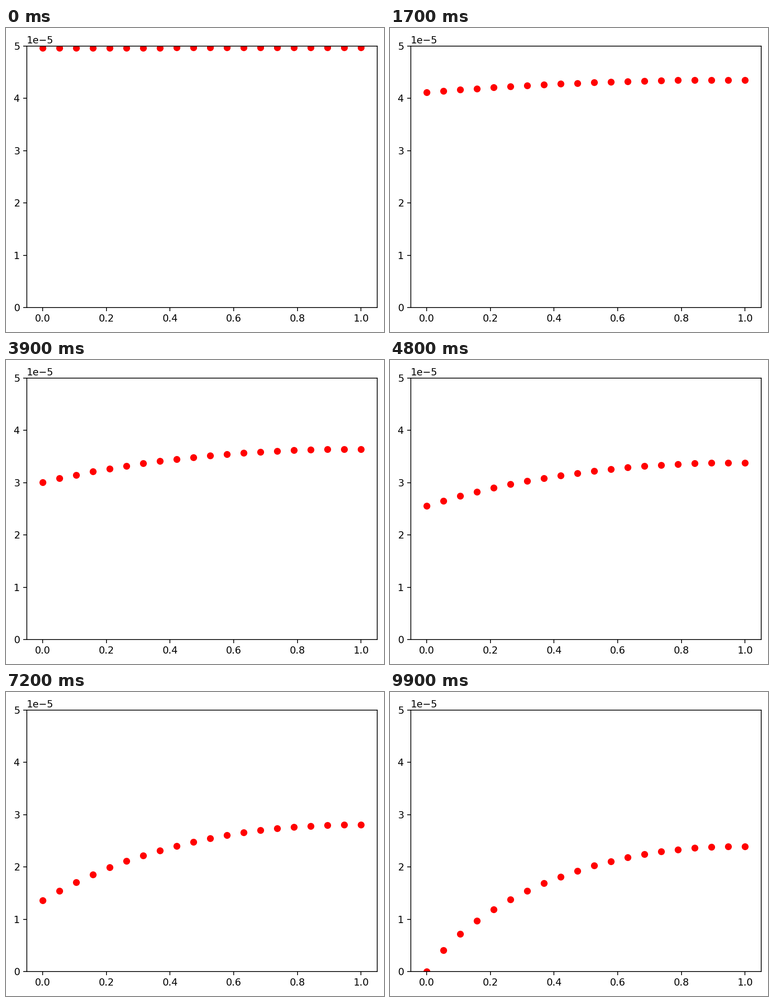
A matplotlib script for the animation above (10 s loop, 835 by 671 pixels).

```python
import numpy as np
import matplotlib.pyplot as plt
from matplotlib.animation import FuncAnimation

W, H, DPI = 835, 671, 156
FRAMES, INTERVAL = 100, 100
N = 20                # points along the pore
R0 = 5.0              # starting radius, in units of 1e-5
FIRST = 0.036         # loss at the inlet before the first frame
RATE = 0.0501         # loss at the inlet per frame
R_END = 2.392         # final radius at the closed end
SUB = 5               # solver steps per frame

x = np.linspace(0, 1, N)
dx = x[1] - x[0]

# Second difference, fixed value at the inlet, no flux at the closed end.
stencil = np.diag(np.full(N, -2.0)) + np.eye(N, k=1) + np.eye(N, k=-1)
stencil[0] = np.eye(N)[0]
stencil[-1] = np.eye(N)[-1] - np.eye(N)[-2]
inlet = np.eye(N)[0]
inner = np.arange(1, N - 1)


def concentration(r, k):
    """Solve c'' = k c / r^2 with c(0) = 1 and c'(1) = 0."""
    m = stencil.copy()
    m[inner, inner] -= k * dx**2 / r[inner]**2
    return np.linalg.solve(m, inlet)


def narrow(k):
    """Radius profile for every frame; walls grow with concentration."""
    r = np.full(N, R0)
    r = r - FIRST * concentration(r, k)
    history = [r]
    for _ in range(FRAMES - 1):
        for _ in range(SUB):
            r = r - RATE / SUB * concentration(r, k)
        history.append(r)
    return np.array(history)


def calibrate(lo=8.0, hi=28.0):
    """Find the reaction constant that leaves R_END at the closed end."""
    for _ in range(18):
        mid = (lo + hi) / 2
        if narrow(mid)[-1, -1] < R_END:
            lo = mid
        else:
            hi = mid
    return (lo + hi) / 2


radius = narrow(calibrate()) * 1e-5

# The tiny surplus keeps the pixel size from rounding down.
fig = plt.figure(figsize=((W + 1e-6) / DPI, (H + 1e-6) / DPI), dpi=DPI,
                 facecolor="white")
left, right, top, bottom = 46, 819.5, 40, 617
ax = fig.add_axes([left / W, 1 - bottom / H,
                   (right - left) / W, (bottom - top) / H])
ax.set_xlim(-0.05, 1.05)
ax.set_ylim(0, 5e-5)
dots, = ax.plot(x, radius[0], "ro")


def update(i):
    dots.set_ydata(radius[i % FRAMES])
    return dots,


anim = FuncAnimation(fig, update, frames=FRAMES, interval=INTERVAL,
                     repeat=True, repeat_delay=0, blit=False)
plt.show()
```
